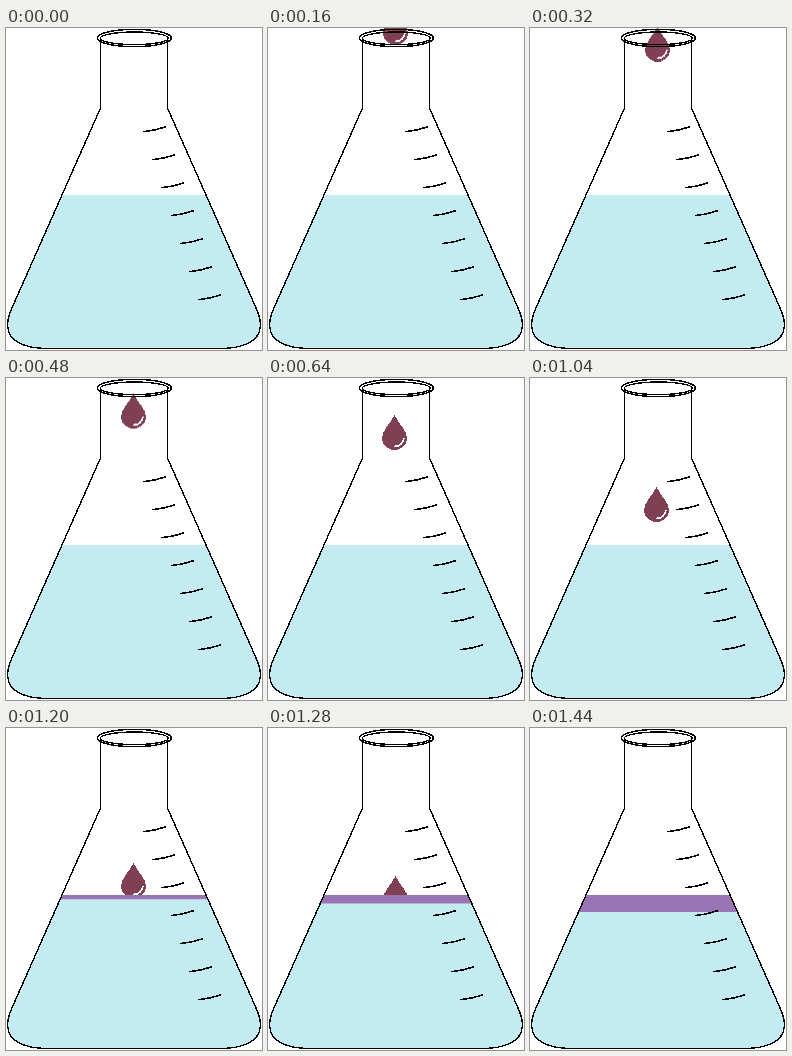
Recreate the animation shown at these times as an HTML page. Size 256x322 px, loop 1.52 s.

```html
<!DOCTYPE html>
<html lang="en">
<head>
<meta charset="utf-8">
<title>Drop into a flask</title>
<style>
html, body { margin: 0; width: 100%; height: 100%; overflow: hidden; background: #fff; }
svg { display: block; width: 256px; height: 322px; shape-rendering: crispEdges; }
.ink { fill: none; stroke: #000; stroke-width: 1.4; }
.drop { animation: fall 1520ms infinite; }
.layer { transform-origin: 0 167px; animation: spread 1520ms infinite; }

/* One tick is 80 ms: 1/19 of the loop */
@keyframes fall {
  0%      { transform: translate(115px, -35px); animation-timing-function: steps(7); }
  36.842% { transform: translate(115px, 24px); animation-timing-function: steps(1); }
  42.105% { transform: translate(114px, 37px); animation-timing-function: steps(2); }
  52.631% { transform: translate(114px, 68px); animation-timing-function: steps(3); }
  68.421% { transform: translate(114px, 109px); animation-timing-function: steps(1); }
  73.684% { transform: translate(114px, 123px); animation-timing-function: steps(1); }
  78.947% { transform: translate(115px, 135px); animation-timing-function: steps(4); }
  100%    { transform: translate(115px, 187px); }
}
@keyframes spread {
  0%      { transform: scaleY(0); animation-timing-function: steps(1); }
  78.947% { transform: scaleY(.25); animation-timing-function: steps(4); }
  100%    { transform: scaleY(1.25); }
}
</style>
</head>
<body>
<svg viewBox="0 0 256 322">
  <defs>
    <path id="flask" d="M94.5 12V80L5.500 281C2 289 1.200 294 1.700 299C3 313 18 320.500 42 320.500H214C238 320.500 253 313 254.300 299C254.800 294 254 289 250.500 281L161.500 80V12"/>
    <path id="tick" d="M137 103.700Q149 102.700 160 98.700"/>
    <clipPath id="inside"><use href="#flask"/></clipPath>
    <clipPath id="air"><rect width="256" height="167"/></clipPath>
  </defs>
  <g clip-path="url(#inside)">
    <rect y="167" width="256" height="155" fill="#c5ebf2"/>
    <rect class="layer" y="167" width="256" height="17" fill="#9b74b5"/>
  </g>
  <g clip-path="url(#air)">
    <g class="drop">
      <path fill="#7f4054" d="M12.500 0C16 8 25 15.500 25 23A12.500 12 0 0 1 0 23C0 15.500 9 8 12.500 0Z"/>
      <path fill="none" stroke="#fff" stroke-width="1.700" d="M22 23A9.500 9 0 0 1 12.500 31.500"/>
    </g>
  </g>
  <g class="ink">
    <use href="#flask"/>
    <ellipse cx="128.300" cy="10" rx="37" ry="8.700" stroke-width="1.500"/>
    <ellipse cx="128.300" cy="10.300" rx="34" ry="6.300"/>
    <g stroke-width="1.600">
      <use href="#tick"/>
      <use href="#tick" x="9.200" y="28"/>
      <use href="#tick" x="18.400" y="56"/>
      <use href="#tick" x="27.600" y="84"/>
      <use href="#tick" x="36.800" y="112"/>
      <use href="#tick" x="46" y="140"/>
      <use href="#tick" x="55.200" y="168"/>
    </g>
  </g>
</svg>
</body>
</html>
```
